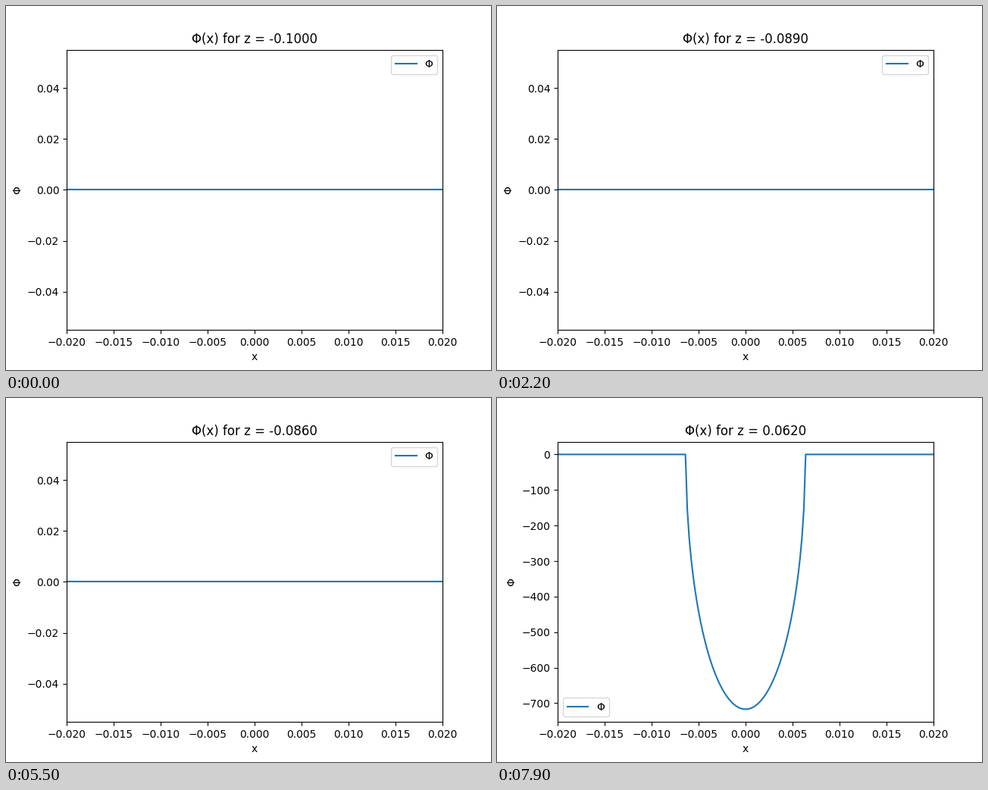
A matplotlib script that plays this animation: 640x480 px, repeating every 8 s.

```python
import numpy as np
import matplotlib.pyplot as plt
from matplotlib.animation import FuncAnimation

FRAMES, INTERVAL = 80, 100
RADIUS = 0.00635      # rod radius
K = 56450             # phase per unit of path
x = np.linspace(-0.02, 0.02, 201)
half = np.sqrt(np.clip(RADIUS**2 - x**2, 0, None))


def step_order():
    """Steps in file-name order: each two-digit step is followed by its tens."""
    order = list(range(11)) + [100]
    for tens in range(10, 17):
        if tens > 10:
            order.append(tens)
        order += range(10 * tens + 1, 10 * tens + 11)
    return order[:FRAMES]


def phase(z):
    """Phase gathered along the path through the rod up to depth z."""
    return -K * (np.clip(z, -half, half) + half)


z_values = [(n - 100) / 1000 for n in step_order()]

fig, ax = plt.subplots(figsize=(6.4, 4.8), dpi=100)


def draw(i):
    z = z_values[i]
    ax.clear()
    ax.plot(x, phase(z), label="Φ")
    ax.set_xlim(-0.02, 0.02)
    ax.set_xlabel("x")
    ax.set_ylabel("Φ")
    ax.set_title(f"Φ(x) for z = {z:.4f}")
    ax.legend()
    return ax.get_children()


anim = FuncAnimation(fig, draw, frames=FRAMES, interval=INTERVAL,
                     init_func=lambda: draw(0), repeat=True, repeat_delay=0)
plt.show()
```
